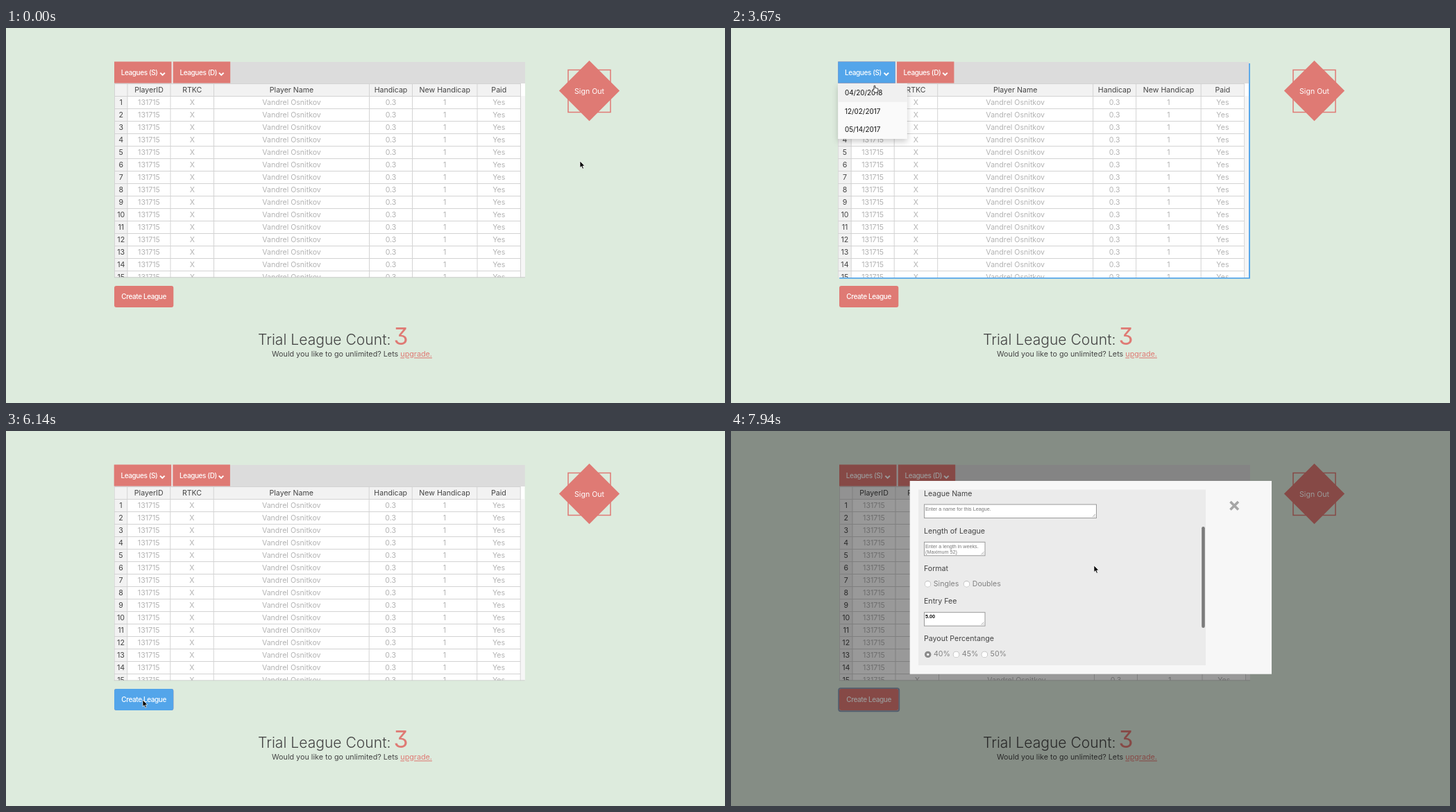
These frames come from a looping animation (1036 by 541 pixels, 8000 ms). An HTML page:

```html
<!DOCTYPE html>
<html lang="en">
<head>
<meta charset="utf-8">
<title>League table</title>
<style>
  html, body { margin: 0; width: 100%; height: 100%; overflow: hidden; background: #ddebdd; }
  svg { display: block; width: 1036px; height: 541px; }
  text { font: 400 10.6px Inter, sans-serif; fill: #444; }
  .mid { text-anchor: middle; }
  .cell { fill: #b2b2b2; }
  .light { fill: #fff; }
  .btn { font-size: 10px; font-weight: 500; letter-spacing: -.4px; fill: #fff; }
  .date { font-size: 9.9px; fill: #111; }
  .big { font-size: 21.1px; font-weight: 300; }
  .count { font-size: 34px; font-weight: 400; fill: #df7a74; font-feature-settings: "cv09"; }
  .ask { font-size: 10.77px; }
  .link { fill: #df7a74; text-decoration: underline; }
  .title { font: 300 25px Roboto, sans-serif; fill: #de7a74; text-anchor: end; }
  .hint { font: 400 7.2px "Liberation Sans", sans-serif; fill: #777; }
  .typed { font: 700 7.2px "Liberation Sans", sans-serif; fill: #111; }
  .option { fill: #808080; }
</style>
</head>
<body>
<svg id="stage" viewBox="0 0 1036 541"></svg>
<script>
const RED = '#df7a74', BLUE = '#53a5ea', LOOP = 8000;
const ROW = 18, ROWS = 15, ITEM = 26.7;
const $ = id => document.getElementById(id);

const rect = (x, y, w, h, fill, more = '') =>
  `<rect x="${x}" y="${y}" width="${w}" height="${h}" fill="${fill}" ${more}/>`;
const text = (x, y, str, cls = '') => `<text x="${x}" y="${y}" class="${cls}">${str}</text>`;
const path = (d, stroke, width) =>
  `<path d="${d}" fill="none" stroke="${stroke}" stroke-width="${width}"/>`;

// ---- table: heading, value, column width ----
const columns = [
  ['', '', 18.5], ['PlayerID', '131715', 62], ['RTKC', 'X', 62.5],
  ['Player Name', 'Vandrel Osnitkov', 224], ['Handicap', '0.3', 62],
  ['New Handicap', '1', 93.5], ['Paid', 'Yes', 62.5]
];

function grid() {
  let out = rect(156, 80, 592, 280, '#fff') + rect(742, 98, 6, 262, '#f6f6f6') +
    rect(156, 80, 585.5, 18, '#f2f2f2') + rect(156, 98, 19, 262, '#f2f2f2');
  let lines = 'M156 80.5H741.5M156.5 80V360', labels = '', x = 156.5;
  for (let r = 0; r < ROWS; r++) lines += `M156 ${98.5 + r * ROW}H741.5`;
  for (const [head, value, width] of columns) {
    const c = x + width / 2;
    labels += text(c, 93.2, head, 'mid');
    for (let r = 0; r < ROWS; r++)
      labels += text(c, 110.9 + r * ROW, value || r + 1, value ? 'mid cell' : 'mid');
    x += width;
    lines += `M${x} 80V360`;
  }
  return `<g clip-path="url(#tableClip)">${out}${path(lines, '#d3d3d3', 1)}${labels}</g>`;
}

const tab = (x, label, id) =>
  rect(x, 48.5, 82.5, 31, RED) + rect(x, 48.5, 82.5, 31, BLUE, `id="${id}"`) +
  text(x + 9.7, 68.2, label, 'btn') +
  path(`M${x + 66.3} 64.6l3.3 3.3 3.3-3.3`, '#fff', 2);

const menu = (x, dates, id) => `<g id="${id}">` +
  rect(x, 80, 99.5, 80, '#fafafa', 'filter="url(#drop)"') +
  rect(x, 80, 99.5, ITEM, '#f0f0f0', `id="${id}Row"`) +
  dates.map((d, i) => text(x + 9.8, 96.8 + i * ITEM, d, 'date')).join('') + '</g>';

// ---- form ----
const field = (y, w) => rect(278.5, y, w, 19.5, '#fff', 'stroke="#9a9a9a"') +
  path(`M${273 + w} ${y + 18}l4-4M${275.5 + w} ${y + 18}l1.5-1.5`, '#888', .7);
const dot = (x, y, r, fill) => `<circle cx="${x}" cy="${y}" r="${r}" fill="${fill}"/>`;
const radio = (x, y, label, on) =>
  dot(x, y, 4.7, on ? '#858585' : '#bdbdbd') + dot(x, y, 3.9, on ? '#8c8c8c' : '#fff') +
  (on ? dot(x, y, 1.7, '#fff') : '') + text(x + 8.3, y + 3.1, label, 'option');

const form = () =>
  text(663.5, 132.8, 'League Creation Form', 'title') +
  text(278, 183.4, 'League Name') + field(195.7, 248) +
  text(280, 204.3, 'Enter a name for this League.', 'hint') +
  text(278, 237.4, 'Length of League') + field(250, 87.5) +
  text(280, 258.6, 'Enter a length in weeks.', 'hint') +
  text(280, 266.8, '(Maximum 52)', 'hint') +
  text(278, 291.6, 'Format') + radio(283.5, 310.5, 'Singles') + radio(339.5, 310.5, 'Doubles') +
  text(278, 339, 'Entry Fee') + field(351.4, 87.5) + text(280, 360.2, '5.00', 'typed') +
  text(278, 393.2, 'Payout Percentange') +
  ['40%', '45%', '50%'].map((p, i) => radio(283.7 + i * 40.8, 412.1, p, i === 0)).join('');

$('stage').innerHTML = `
<defs>
  <clipPath id="tableClip"><rect x="156" y="79.5" width="592" height="280.5"/></clipPath>
  <clipPath id="formClip"><rect x="270" y="84.5" width="414" height="253.5"/></clipPath>
  <filter id="drop" x="-20%" y="-20%" width="140%" height="150%">
    <feDropShadow dx="0" dy="4" stdDeviation="4" flood-color="#000" flood-opacity=".2"/>
  </filter>
</defs>` +
  rect(0, 0, 1036, 541, '#ddebdd') +
  rect(810, 60.5, 61, 61, 'none', `stroke="${RED}" stroke-width="1.5"`) +
  `<path d="M840.5 47l43.6 43.6-43.6 43.6-43.6-43.6z" fill="${RED}"/>` +
  text(840.5, 94.5, 'Sign Out', 'mid light') +
  '<g id="table">' +
    rect(158, 51, 591.8, 310.7, BLUE, 'id="glow"') +
    rect(156, 49, 592, 31, '#dcdcdc') + rect(238.5, 49, 2.5, 31, '#ebebeb') + grid() +
    rect(156, 359.3, 592, 1, '#c6c9c6', 'id="base"') +
    tab(156, 'Leagues (S)', 'tabS') + tab(240.7, 'Leagues (D)', 'tabD') +
    menu(156, ['04/20/2018', '12/02/2017', '05/14/2017'], 'menuS') +
    menu(240.7, ['05/18/2018', '11/24/2017', '06/10/2017'], 'menuD') +
  '</g>' +
  rect(155.2, 371.2, 87, 33, 'none', 'id="ring" rx="3" stroke="#8c9ab4" stroke-width="2"') +
  rect(156, 372, 85.3, 31, RED, 'rx="3"') + rect(156, 372, 85.3, 31, BLUE, 'rx="3" id="create"') +
  text(198.6, 391.2, 'Create League', 'mid btn') +
  text(363, 456.6, 'Trial League Count:', 'big') + text(558.5, 457.3, '3', 'count') +
  text(383, 474.4, 'Would you like to go unlimited? Lets <tspan class="link">upgrade.</tspan>', 'ask') +
  '<g id="modal">' +
    rect(0, 0, 1036, 541, '#000', 'opacity=".4"') +
    rect(257.7, 72, 521.3, 278.7, '#f7f7f7') + rect(270, 84.5, 414, 253.5, '#ebebeb') +
    `<g clip-path="url(#formClip)"><g id="form">${form()}</g></g>` +
    rect(678.2, 86, 4.6, 146, '#7b7b7b', 'rx="2.3" id="thumb"') +
    path('M719.5 102l11.5 11.5m0-11.5l-11.5 11.5', '#a6a6a6', 3.6) +
  '</g>' +
  `<path id="arrow" d="M0 0V9.6L2.2 7.6 3.7 11.2 5.4 10.5 3.9 7H6.9Z" fill="#000" stroke="#fff" stroke-width=".7"/>` +
  `<path id="hand" d="M2.2 6V1.2a.9.9 0 0 1 1.8 0V4q.8-.8 1.5.1.8-.5 1.3.3 1.3-.3 1.3 1V7.6L7.2 10.3H3.3L.5 6.6Q.2 5.4 1.3 5.4Z" fill="#fff" stroke="#000" stroke-width=".8"/>`;

// ---- motion ----
// Rises from 0 to 1 in n even jumps, the first at a, the last at b.
const ramp = (t, a, b, n) =>
  t < a ? 0 : t >= b ? 1 : (Math.floor((t - a) / (b - a) * (n - 1)) + 1) / n;
const easeOut = p => 1 - (1 - p) ** 2;

// Pointer legs: first jump, last jump, jumps, end point.
const legs = [
  [530, 1210, 4, 454, 121],
  [1450, 2540, 7, 281, 70],
  [3110, 3480, 3, 205, 68],
  [3660, 4380, 5, 199, 142],
  [5100, 5100, 1, 199, 294],
  [5270, 5870, 4, 197, 388],
  [6610, 7030, 3, 523, 194]
];

function pointer(t) {
  let x = 827, y = 192;
  for (const [a, b, n, toX, toY] of legs) {
    const p = ramp(t, a, b, n);
    x += (toX - x) * p;
    y += (toY - y) * p;
  }
  return [x, y];
}

const set = (id, name, v) => $(id).setAttribute(name, v);
const show = (id, on) => { $(id).style.display = on ? '' : 'none'; };

function draw(t) {
  const [x, y] = pointer(t);
  const lift = easeOut(ramp(t, 770, 1430, 4)) - easeOut(ramp(t, 5470, 6380, 5));
  const blue = ramp(t, 5470, 6140, 4) - ramp(t, 6610, 6820, 2);
  const scroll = 89.7 * ramp(t, 7380, 7940, 4);
  const openD = t >= 2750 && t < 3290;
  const openS = t >= 3290 && t < 5270;
  const modal = t >= 6380;
  const onHand = t >= 2350 && t < 5100;

  set('table', 'transform', `translate(${-1.8 * lift} 0)`);
  set('glow', 'opacity', Math.max(0, (lift - .3) / .7));
  set('base', 'opacity', 1 - lift);
  set('tabS', 'opacity', +openS);
  set('tabD', 'opacity', +openD);
  show('menuS', openS);
  show('menuD', openD);
  show('menuDRow', false);

  const row = Math.min(2, Math.floor((y - 80) / ITEM));
  show('menuSRow', row >= 0);
  set('menuSRow', 'y', 80 + row * ITEM);

  set('create', 'opacity', blue);
  show('ring', modal);
  show('modal', modal);
  set('form', 'transform', `translate(0 ${-scroll})`);
  set('thumb', 'y', 86 + scroll * .58);
  show('thumb', scroll > 0);

  show('arrow', !onHand);
  show('hand', onHand);
  set(onHand ? 'hand' : 'arrow', 'transform', `translate(${x} ${y})`);
}

const start = performance.now();
function tick(now) {
  draw(Math.max(0, now - start) % LOOP);
  requestAnimationFrame(tick);
}
draw(0);
requestAnimationFrame(tick);
</script>
</body>
</html>
```
